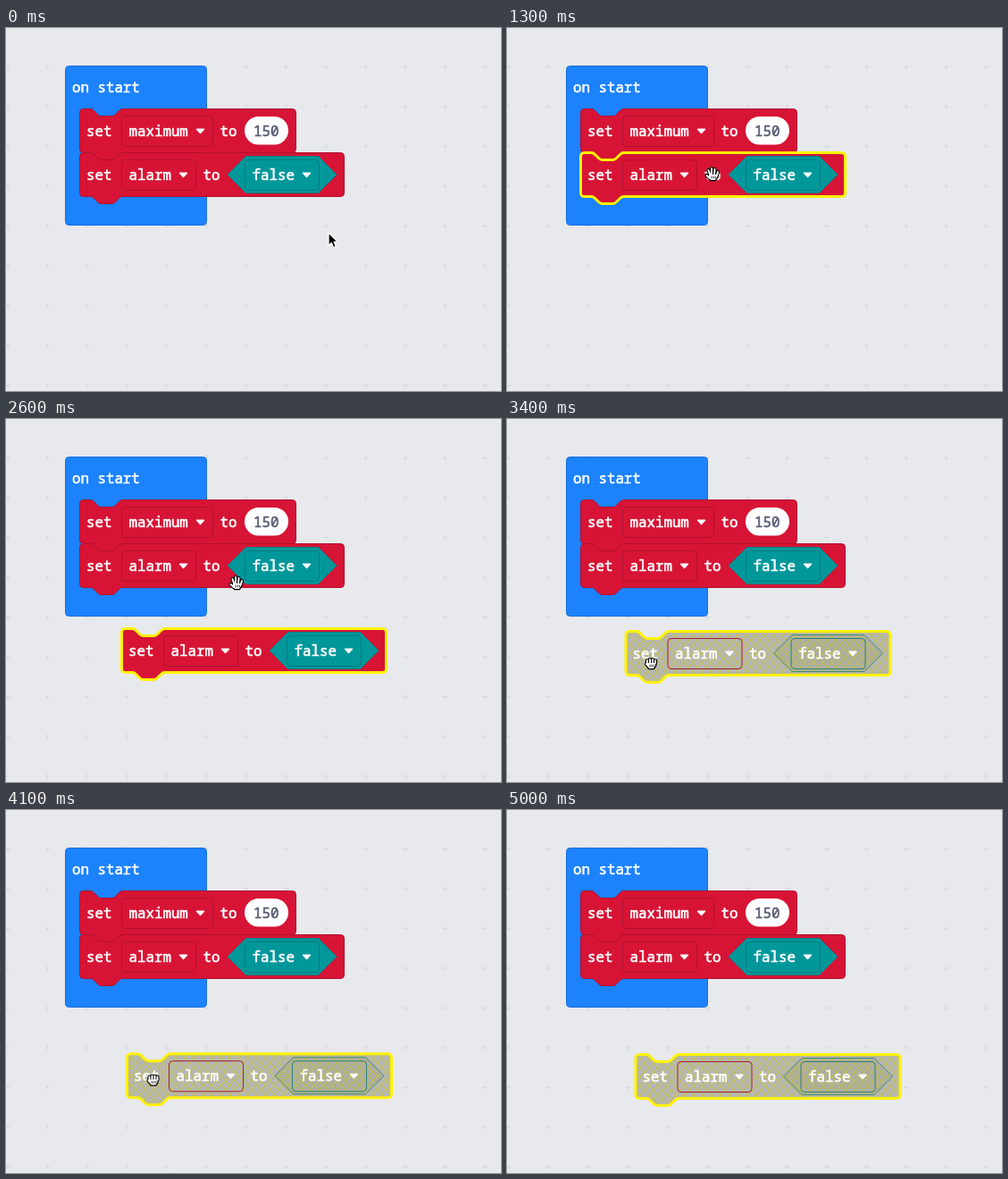
An HTML page with a canvas for the animation above (5100 ms loop, 554x406 px).

```html
<!DOCTYPE html>
<html lang="en">
<head>
<meta charset="utf-8">
<title>Duplicating a block</title>
<style>
  html, body { margin: 0; width: 100%; height: 100%; overflow: hidden; background: #e8e9ed; }
  canvas { display: block; width: 554px; height: 406px; }
</style>
</head>
<body>
<canvas id="stage" width="554" height="406"></canvas>
<script>
const ctx = document.getElementById('stage').getContext('2d');
const LOOP = 5100, STEP = 100;
const FONT = '500 15.8px "Noto Sans Mono", "DejaVu Sans Mono", monospace';
const RED = { fill: '#d71435', edge: '#b01030' };
const TEAL = { fill: '#00979b', edge: '#007b7f' };
const BLUE = { fill: '#1c82fe', edge: '#1a70d8' };
const YELLOW = '#fff200';

// Moments at which the picture changes state
const SELECT = 1200, COPY = 2500, DISABLE = 2800, GRAB = 3300, DROP = 4300, HIDE = 4700;

// Tracks: [time, x, y]
const pointerTrack = [
  [0, 361, 229], [300, 361, 229], [600, 345, 204], [1200, 230, 164],
  [1700, 230, 164], [2200, 258, 184], [2600, 258, 184], [3300, 160, 266],
  [3400, 161, 273], [3800, 148, 291], [4000, 156, 301], [4200, 173, 302]
];
const copyTrack = [
  [3300, 129.5, 234.5], [3400, 133, 237.5], [3800, 121, 263.5],
  [4000, 127, 272], [4200, 144, 273.5]
];

const NOTCH = 'c2 0 3 1 4 2l4 4c1 1 2 2 4 2h12c2 0 3 -1 4 -2l4 -4c1 -1 2 -2 4 -2';
const TAB = 'c-2 0 -3 1 -4 2l-4 4c-1 1 -2 2 -4 2h-12c-2 0 -3 -1 -4 -2l-4 -4c-1 -1 -2 -2 -4 -2';
const stackPath = (w, h) => new Path2D(
  `M0 4a4 4 0 0 1 4 -4H12${NOTCH}H${w - 4}a4 4 0 0 1 4 4V${h - 4}a4 4 0 0 1 -4 4H48${TAB}H4a4 4 0 0 1 -4 -4Z`);

const maximumPath = stackPath(242, 49);
const alarmPath = stackPath(296, 49);
const hexPath = new Path2D('M165.5 24.5l20.5 -20.5h81l20.5 20.5l-20.5 20.5h-81Z');
const arrowPath = new Path2D('M0 0V14.2L3.3 11.2L5.6 16.6L8.3 15.4L6 10.2H10.4Z');

function at(track, t) {
  if (t <= track[0][0]) return track[0].slice(1);
  const i = track.findIndex(key => key[0] > t);
  if (i < 0) return track[track.length - 1].slice(1);
  const [t0, x0, y0] = track[i - 1], [t1, x1, y1] = track[i];
  const u = (t - t0) / (t1 - t0), e = u * u * (3 - 2 * u);
  return [x0 + (x1 - x0) * e, y0 + (y1 - y0) * e];
}

function rounded(x, y, w, h, r) {
  const path = new Path2D();
  path.roundRect(x, y, w, h, r);
  return path;
}

function paint(path, fill, edge, width = 1) {
  if (fill) { ctx.fillStyle = fill; ctx.fill(path); }
  if (edge) { ctx.strokeStyle = edge; ctx.lineWidth = width; ctx.stroke(path); }
}

// The thin stroke gives the text a medium weight
function label(text, x, y, color = '#fff') {
  ctx.fillStyle = ctx.strokeStyle = color;
  ctx.lineWidth = 0.6;
  ctx.lineJoin = 'round';
  ctx.fillText(text, x, y);
  ctx.strokeText(text, x, y);
}

function dropdown(text, x, w, edge) {
  paint(rounded(x, 8, w, 34, 4), null, edge);
  label(text, x + 8, 30.5);
  const cx = x + w - 14;
  paint(new Path2D(`M${cx - 4} 22.8h8l-4 4.2Z`), '#fff', '#fff', 1.4);
}

// Grey fill with crossed olive lines, tiled every 10 px
function hatch(path, shift = 0) {
  ctx.save();
  ctx.clip(path);
  ctx.globalAlpha = 0.8;
  ctx.fillStyle = '#aaa';
  ctx.fillRect(-2, -2, 304, 64);
  ctx.strokeStyle = '#cc0';
  ctx.lineWidth = 1;
  ctx.beginPath();
  for (let x = shift - 60; x < 360; x += 10) {
    ctx.moveTo(x, 0); ctx.lineTo(x + 60, 60);
    ctx.moveTo(x, 0); ctx.lineTo(x - 60, 60);
  }
  ctx.stroke();
  ctx.restore();
}

function withOrigin(x, y, draw) {
  ctx.save();
  ctx.translate(x, y);
  draw();
  ctx.restore();
}

function alarmBlock(x, y, selected, disabled) {
  withOrigin(x, y, () => {
    if (disabled) hatch(alarmPath);
    else paint(alarmPath, RED.fill, RED.edge);
    if (selected) paint(alarmPath, null, YELLOW, 3);
    if (disabled) hatch(hexPath, 5);
    paint(hexPath, disabled ? null : TEAL.fill, disabled ? '#3f8a80' : TEAL.edge);
    label('set', 7.5, 30.5);
    dropdown('alarm', 47, 83, disabled ? '#a8183a' : RED.edge);
    label('to', 138, 30.5);
    dropdown('false', 185, 83, disabled ? '#277f80' : TEAL.edge);
  });
}

function maximumBlock() {
  withOrigin(82.5, 90.5, () => {
    paint(maximumPath, RED.fill, RED.edge);
    label('set', 7.5, 30.5);
    dropdown('maximum', 47, 102, RED.edge);
    label('to', 157, 30.5);
    paint(rounded(184.5, 8.5, 49, 31.5, 15.75), '#fff');
    label('150', 194.5, 30.5, '#575e75');
  });
}

function grid() {
  ctx.strokeStyle = '#d8d9de';
  ctx.lineWidth = 1;
  ctx.beginPath();
  for (let x = 2; x < 554; x += 44.5) {
    for (let y = 43.5; y < 406; y += 44.5) {
      ctx.moveTo(x - 3, y); ctx.lineTo(x + 3, y);
      ctx.moveTo(x, y - 3); ctx.lineTo(x, y + 3);
    }
  }
  ctx.stroke();
}

function hand(closed) {
  const shape = new Path2D(closed
    ? 'M-4 -3V0M-1 -4V0M2 -4V0M5 -3V0M-5 1L-3 3'
    : 'M-4.5 -5L-2.5 1M-1 -7V0M2.5 -6L2 0M6 -3L4.5 2M-6.5 1L-3 4');
  const palm = new Path2D('M-4 0H5V3L3 6H-2L-4 3Z');
  ctx.lineCap = ctx.lineJoin = 'round';
  paint(shape, null, '#000', 4.2);
  paint(palm, '#000', '#000', 2.6);
  paint(shape, null, '#fff', 2);
  paint(palm, '#fff');
  paint(new Path2D('M-1 2V4M1.2 2V4M3.3 2V4'), null, '#000', 0.8);
}

function pointer(t) {
  if (t >= HIDE) return;
  const [x, y] = at(pointerTrack, t);
  const overCanvas = t < 900 || (t >= 2800 && t < 3200);
  withOrigin(x, y, () => {
    if (overCanvas) paint(arrowPath, '#000', '#fff', 1.2);
    else hand(t >= GRAB && t < DROP);
  });
}

function draw(t) {
  ctx.fillStyle = '#e8e9ed';
  ctx.fillRect(0, 0, 554, 406);
  ctx.font = FONT;
  ctx.textBaseline = 'alphabetic';
  grid();
  paint(rounded(66.5, 42.5, 158, 178, 4), BLUE.fill, BLUE.edge);
  label('on start', 74, 71.7);
  maximumBlock();
  alarmBlock(82.5, 139.5, t >= SELECT && t < COPY, false);
  if (t >= COPY) alarmBlock(...at(copyTrack, t), true, t >= DISABLE);
  pointer(t);
}

const start = performance.now();
function tick() {
  const t = (performance.now() - start) % LOOP;
  draw(Math.floor(t / STEP) * STEP);
  requestAnimationFrame(tick);
}
tick();
</script>
</body>
</html>
```
